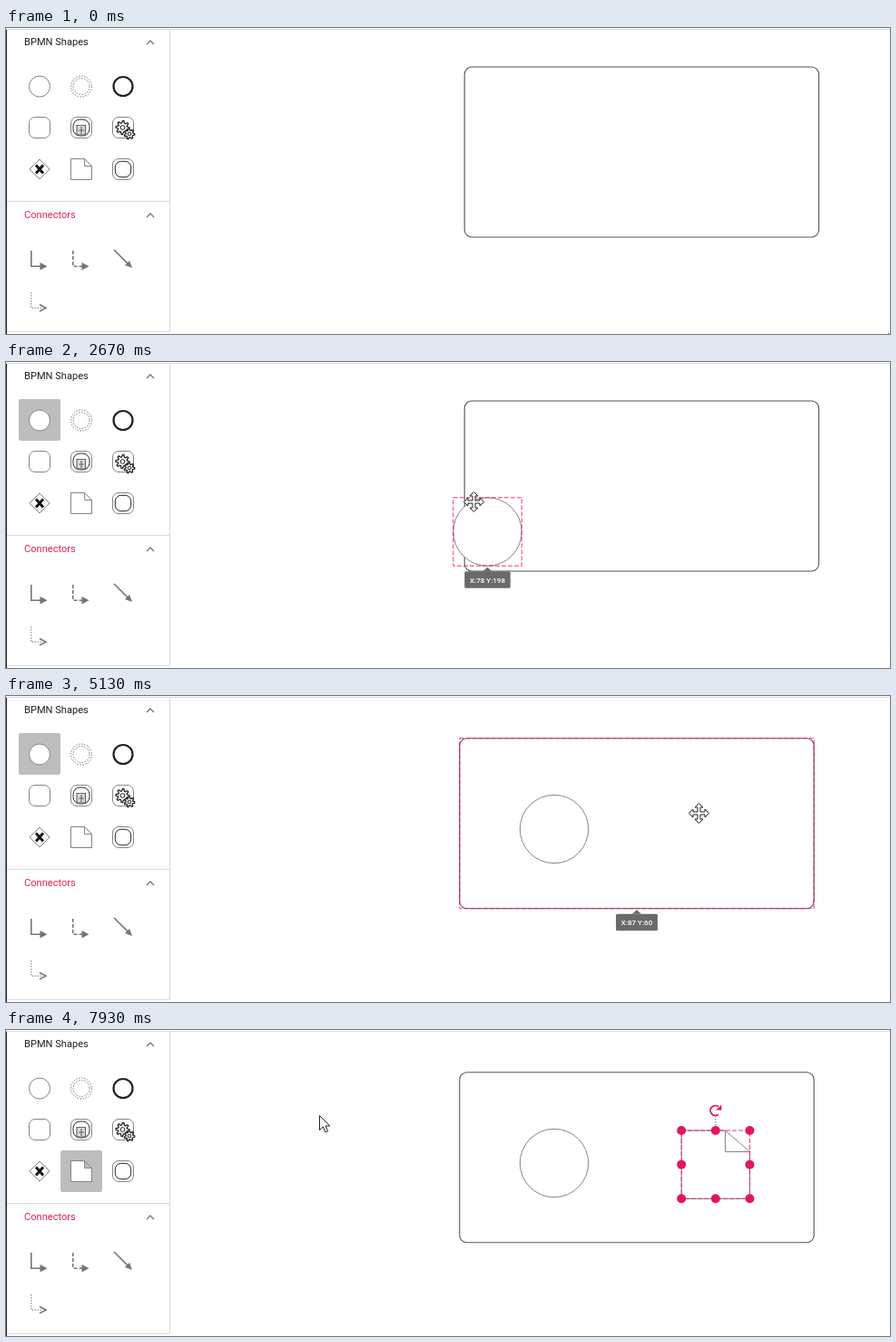
An HTML page for the animation above (8000 ms loop, 974 by 338 pixels).

```html
<!DOCTYPE html>
<html lang="en">
<head>
<meta charset="utf-8">
<title>Diagram editor</title>
<style>
  html, body { margin: 0; width: 100%; height: 100%; overflow: hidden; background: #fff; }
  svg { display: block; font-family: Roboto, sans-serif; }
  .title { font-size: 11.1px; }
  .tip { font-size: 8px; font-weight: 500; fill: #fff; text-anchor: middle; }
  .thin { fill: #fff; stroke: #858585; }
  .dark { fill: #fff; stroke: #222; }
  .wire { fill: none; stroke: #757575; stroke-width: 1.6; }
  .dotted { fill: none; stroke: #757575; stroke-dasharray: 1.5 1.5; }
  .head { fill: #757575; }
  .accent { fill: none; stroke: #e3165b; stroke-width: 1.9; }
  .dash { fill: none; stroke: #e3165b; stroke-opacity: .85; stroke-dasharray: 5 2; }
  .handle { fill: #e3165b; }
</style>
</head>
<body>
<svg width="974" height="338" viewBox="0 0 974 338">
  <path d="M0 1.5H974M180.5 2V335M1 191.5H180M1 335.5H181" stroke="#dcdcdc"/>
  <path d="M.5 2V338" stroke="#222"/>
  <text class="title" x="20" y="19" fill="#212121">BPMN Shapes</text>
  <text class="title" x="20" y="210" fill="#e0214f">Connectors</text>
  <path d="M155 18l4-4 4 4M155 209l4-4 4 4" fill="none" stroke="#757575" stroke-width="1.3"/>
  <g id="back"></g>
  <g id="palette"></g>
  <g id="scene"></g>
</svg>
<script>
const TICK = 1000 / 15, TICKS = 120, CELL = 46;
const byId = id => document.getElementById(id);
const clamp = v => Math.max(0, Math.min(1, v));
const mix = (a, b, f) => a + (b - a) * f;

// ---- drawing helpers
const box = (x, y, w, h, attrs) => `<rect x="${x}" y="${y}" width="${w}" height="${h}" ${attrs}/>`;
const disc = (x, y, r, attrs) => `<circle cx="${x}" cy="${y}" r="${r}" ${attrs}/>`;
const path = (d, attrs) => `<path d="${d}" ${attrs}/>`;
const move = (x, y, content) => `<g transform="translate(${x} ${y})">${content}</g>`;
const rounded = (r, corner, style) => box(-r, -r, 2 * r, 2 * r, `rx="${corner}" class="${style}"`);

function gear(x, y, r, teeth) {
  const points = Array.from({ length: teeth * 4 }, (_, i) => {
    const a = i / teeth / 2 * Math.PI, d = i % 4 < 2 ? r : r * .68;
    return `${x + d * Math.cos(a)},${y + d * Math.sin(a)}`;
  });
  return `<polygon class="dark" stroke-width="1.3" points="${points.join(' ')}"/>` + disc(x, y, r * .32, 'class="dark"');
}

function note(x, y, size, fold, foldY = fold) {
  const flat = size - fold;
  return path(`M${x} ${y}h${flat}l${fold} ${foldY}v${size - foldY}h${-size}zm${flat} 0v${foldY}h${fold}`, 'class="thin"');
}

// ---- palette: every icon is drawn around the centre of its cell
const task = rounded(11.5, 6.5, 'thin');
const elbow = 'M-9.2-9V8.200H2';
const arrow = path('M.5 4l8 4.200-8 4.200z', 'class="head"');
const shapes = [
  disc(0, 0, 11.5, 'class="thin"'),
  disc(0, 0, 11.5, 'class="dotted"') + disc(0, 0, 9, 'class="dotted"'),
  disc(0, 0, 10.5, 'class="dark" stroke-width="2.2"'),
  task,
  task + rounded(9, 7.5, 'dark') + path('M-5-2.500H4.500V8H-5zM0-1v8M-3 3h6', 'fill="#ddd" stroke="#666" stroke-width="1.2"'),
  task + gear(-.5, 0, 7.5, 8) + gear(7, 7, 5.8, 7),
  path('M0-11L11 0 0 11-11 0z', 'class="thin"') + path('M-4-4.500l8 9M4-4.500l-8 9', 'stroke="#111" stroke-width="2.8"'),
  note(-11.5, -11.5, 23, 8),
  task + rounded(8.7, 6.5, 'dark')
];
const connectors = [
  path(elbow, 'class="wire"') + arrow,
  path(elbow, 'class="wire" stroke-dasharray="4 2"') + arrow,
  path('M-10-10L7 7', 'class="wire"') + path('M10 10L2 7 7 2z', 'class="head"'),
  path(elbow, 'class="dotted"') + path('M0 4.500l7 3.700-7 3.700', 'class="wire"')
];
const grid = (icons, top) => icons.map((icon, i) =>
  move(37 + i % 3 * CELL, top + Math.floor(i / 3) * CELL - (top < 100 && i > 2 ? .5 : 0), icon)).join('');
byId('palette').innerHTML = grid(shapes, 64.5) + grid(connectors, 255);

const highlight = (col, row, color) =>
  box(14 + col * CELL, 41 + row * CELL, CELL, CELL, `rx="2" fill="${color}"`);

// ---- overlays
function handles(x, y, w, h) {
  let out = '';
  for (let i = 0; i < 9; i++)
    if (i !== 4) out += disc(x + w * (i % 3) / 2, y + h * Math.floor(i / 3) / 2, 5, 'class="handle"');
  return out;
}

function selection(x, y, size) {
  const cx = x + size / 2;
  const rotate = path('M3.500 4.200A5.400 5.400 0 1 1 3.500-4.200', 'class="accent"') + path('M7-6.500v6H1z', 'class="handle"');
  return box(x, y, size, size, 'class="dash"') + path(`M${cx} ${y - 16}v16`, 'class="dotted"') +
    move(cx - .5, y - 22, rotate) + handles(x, y, size, size);
}

function tooltip(cx, top, width, text, arrowX = cx) {
  return path(`M${arrowX - 5} ${top}l5-4.500 5 4.500z`, 'fill="#6a6a6a"') +
    box(cx - width / 2, top, width, 18.5, 'rx="1.5" fill="#6a6a6a"') +
    `<text class="tip" x="${cx}" y="${top + 12.3}">${text}</text>`;
}

// Dashed bounds with a position label; the diagram is shown at 80 % zoom.
function dragBounds(x, y, w, h, dx = 0, dy = 0) {
  const label = `X:${Math.floor(77.2 + (x - 491.4) * 1.25 + dx)} Y:${Math.floor(55.5 + (y - 43) * 1.25 + dy)}`;
  return box(x, y, w, h, 'class="dash"') + tooltip(x + w / 2, y + h + 6, label.length * 4.6 + 4.5, label);
}

function pointer(x, y, moving) {
  const arm = 'M0-11l4.500 4.500h-3v5h5v-3L11 0 6.500 4.500v-3h-5v5h3L0 11l-4.500-4.500h3v-5h-5v3L-11 0l4.500-4.500v3h5v-5h-3z';
  const tip = 'M.5.5v16l3.800-3.500 2.800 6 2.600-1.200-2.700-5.800H12z';
  return move(x + moving / 2, y + moving / 2, path(moving ? arm : tip, 'class="dark"'));
}

// ---- motion, in ticks
const stops = [
  { from: 11, to: 20, x: 113, y: 98 },
  { from: 20, to: 24, x: 178, y: 126 },
  { from: 24, to: 32, x: 40, y: 62 },
  { from: 33, to: 40, x: 515, y: 154, lift: 95 },
  { from: 40, to: 45, x: 594, y: 110 },
  { from: 49, to: 61, x: 696, y: 116 },
  { from: 75, to: 77, x: 763, y: 129 },
  { from: 77, to: 90, x: 70, y: 150 },
  { from: 95, to: 105, x: 703, y: 126.5 },
  { from: 105, to: 108, x: 750.2, y: 109 },
  { from: 109, to: 119, x: 345, y: 94 }
];

function cursorAt(t) {
  let x = 972, y = 337;
  for (const stop of stops) {
    const f = clamp((t - stop.from) / (stop.to - stop.from)), eased = f * f * (3 - 2 * f);
    x = mix(x, stop.x, eased);
    y = mix(y, stop.y, eased) - (stop.lift || 0) * Math.sin(Math.PI * f);
  }
  return [x, y];
}

// The frame is pulled to the left and brought back close to where it was.
function frameShift(t) {
  const f = clamp((t - 62) / 13), swing = Math.sin(Math.PI * f);
  return [-5.4 * f - 56 * swing, 3.7 * f - swing];
}

function render(t) {
  const during = (from, to) => t >= from && t <= to;
  const W = 390.4, H = 188, R = 37.7, SIZE = 75.3;
  const [dx, dy] = frameShift(t), fx = 505.2 + dx, fy = 43 + dy;
  let [mx, my] = cursorAt(t);
  if (during(62, 75)) { mx += dx; my += dy; }

  let back = '';
  if (during(17, 22)) back += highlight(1, 1, '#eee');
  if (during(30, 33)) back += highlight(0, 0, '#eee');
  if (during(34, 95)) back += highlight(0, 0, '#bdbdbd');
  if (t >= 87) back += highlight(1, 2, t < 96 ? '#eee' : '#bdbdbd');

  let scene = box(fx, fy, W, H, 'rx="8" fill="#fff" stroke="#555" stroke-width="1.1"');
  if (during(41, 44) || during(61, 62)) scene += box(fx, fy, W, H, 'rx="8" class="accent"');

  const placingCircle = during(34, 44);
  const cx = placingCircle ? mx + 15.5 : fx + 104.2, cy = placingCircle ? my + 33.5 : fy + 100.3;
  if (t >= 34) scene += disc(cx, cy, R, 'class="thin"');
  if (placingCircle) scene += dragBounds(cx - R, cy - R, 2 * R, 2 * R, 0, 9.5);
  if (during(45, 60)) scene += selection(cx - R, cy - R, 2 * R);

  if (during(63, 77)) scene += dragBounds(fx, fy, W, H);
  if (during(78, 108)) scene += box(fx, fy, W, H, 'class="accent"') + handles(fx, fy, W, H);

  if (t >= 96) {
    const [px, py] = cursorAt(Math.min(t, 109)), nx = px - 6, ny = py + 2;
    scene += note(nx, ny, SIZE, 27, 23.5);
    scene += t < 109 ? dragBounds(nx, ny, SIZE, SIZE, 16, 7) : selection(nx, ny, SIZE);
  }

  const hint = clamp(Math.min((t - 17) / 5, (25 - t) / 3));
  if (hint) scene += `<g opacity="${hint}">${tooltip(114, 129, 54, 'Transaction', 96)}</g>`;
  scene += pointer(mx, my, during(34, 46) || during(61, 80) || during(96, 108));

  byId('back').innerHTML = back;
  byId('scene').innerHTML = scene;
}

let shown = -1;
function play() {
  const tick = Math.floor(performance.now() / TICK + .1) % TICKS;
  if (tick !== shown) render(shown = tick);
  requestAnimationFrame(play);
}
play();
</script>
</body>
</html>
```
